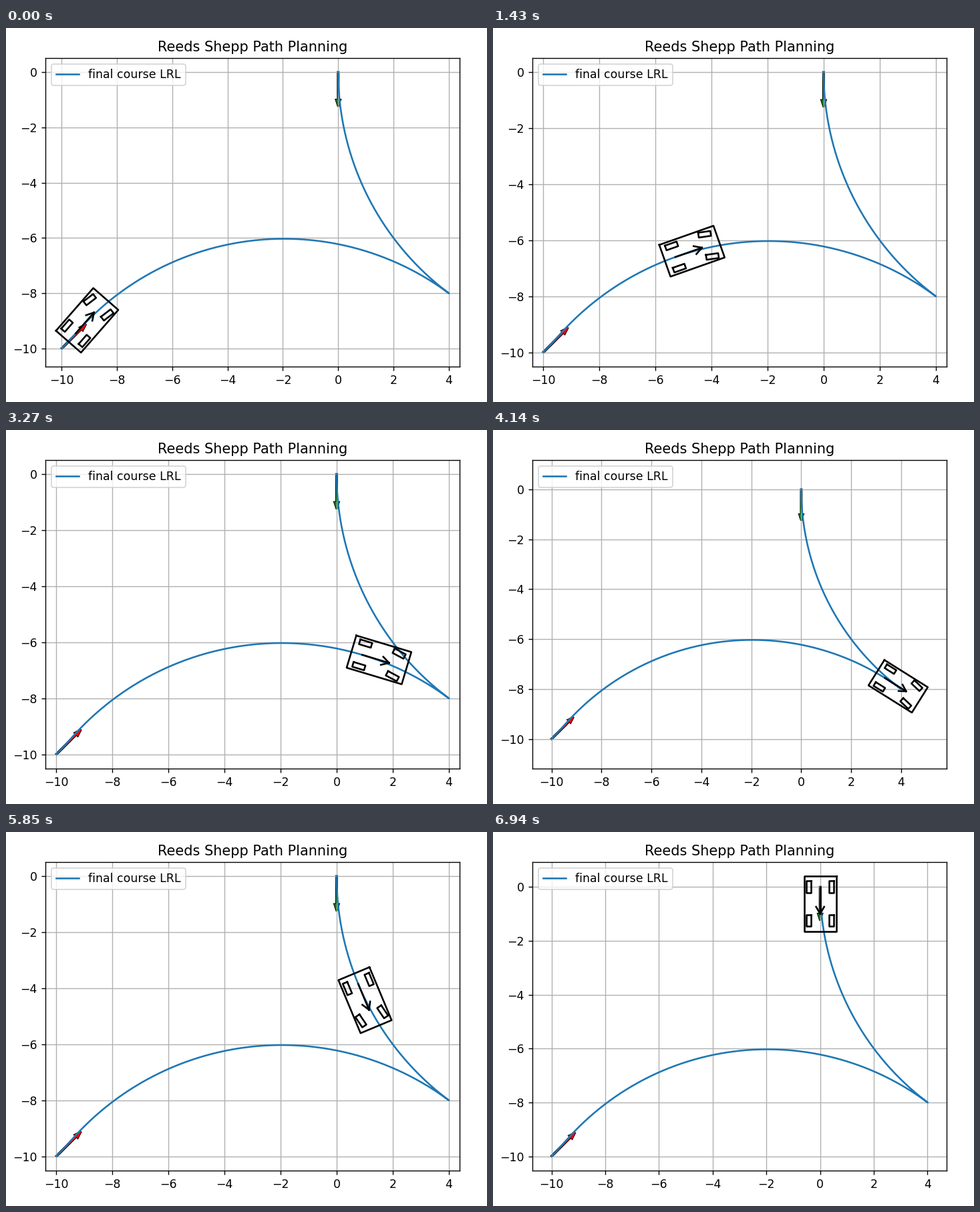
Write a matplotlib script that moves like this. It is 720x560 px and loops after 7.31 s.

```python
import numpy as np
import matplotlib.pyplot as plt
from matplotlib.animation import FuncAnimation

W, H, DPI = 720, 560, 125
LOOP, STEP = 7310, 34  # ms

# Reeds-Shepp path: left forward, right forward, left backward
R = 10.0
YAW0, YAW3 = np.deg2rad(45), np.deg2rad(-90)
START, GOAL = np.array([-10.0, -10.0]), np.array([0.0, 0.0])


def normal(yaw):
    return np.array([-np.sin(yaw), np.cos(yaw)])


C1 = START + R * normal(YAW0)
C3 = GOAL + R * normal(YAW3)
half = (C3 - C1) / 2
dist = np.hypot(*half)
C2 = (C1 + C3) / 2 + np.array([half[1], -half[0]]) / dist * np.sqrt(4 * R * R - dist ** 2)

YAW1 = np.arctan2(*(C2 - C1)[::-1]) + np.pi / 2
YAW2 = np.arctan2(*(C3 - C2)[::-1]) - np.pi / 2
YAWS = [YAW0, YAW1, YAW2, YAW3]
MARKS = np.concatenate([[0], np.cumsum(R * np.abs(np.diff(YAWS)))])
TOTAL = MARKS[-1]


def pose(s):
    yaw = np.interp(s, MARKS, YAWS)
    if s < MARKS[1]:
        return C1 - R * normal(yaw), yaw
    if s < MARKS[2]:
        return C2 + R * normal(yaw), yaw
    return C3 - R * normal(yaw), yaw


# Distance driven over time, and the moments when the view stalls
TIMES = [0, 680, 1520, 2250, 2940, 3600, 4140, 4850, 5180, 5850, 6020, 6940]
DRIVEN = [0.75, 3.28, 6.14, 8.55, 10.95, 13.35, 14.9, 17.65, 18.8, 21.03, 21.7, TOTAL]
STALLS = [(0, 30), (680, 790), (2250, 2320), (2940, 3270), (3600, 3800),
          (4850, 4920), (5180, 5310), (5850, 5950)]


def driven(t):
    for a, b in STALLS:
        if a <= t < b:
            t = a
    return np.interp(t, TIMES, DRIVEN)


# Vehicle dimensions
FRONT, REAR, WIDTH = 1.65, 0.4, 1.2
BASE, TREAD = 1.25, 0.84
TIRE_R, TIRE_W = 0.22, 0.175
STEER = np.arctan(0.2)


def box(x0, x1, w):
    return np.array([[x0, x0, x1, x1, x0], [w, -w, -w, w, w]])


def rotate(pts, a):
    c, s = np.cos(a), np.sin(a)
    return np.array([[c, -s], [s, c]]) @ pts


def car_shapes(steer):
    shapes = [box(-REAR, FRONT, WIDTH / 2)]
    tire = box(-TIRE_R, TIRE_R, TIRE_W / 2)
    for x, a in ((0, 0), (BASE, steer)):
        for y in (-TREAD / 2, TREAD / 2):
            shapes.append(rotate(tire, a) + np.array([[x], [y]]))
    length = 0.8 * BASE
    shapes.append(np.array([[0, length], [0, 0]]))
    for a in (np.pi - np.pi / 6, np.pi + np.pi / 6):
        wing = 0.3 * length * np.array([np.cos(a), np.sin(a)])
        shapes.append(np.array([[length, length + wing[0]], [0, wing[1]]]))
    return shapes


fig = plt.figure(figsize=(W / DPI, H / DPI), dpi=DPI)
ax = fig.add_axes([59 / W, 53 / H, 620 / W, 462 / H])
course = np.array([pose(s)[0] for s in np.linspace(0, TOTAL, 500)])
ax.plot(course[:, 0], course[:, 1], label="final course LRL")


def marker(p, yaw, color):
    for edge, lw in (("k", 1.6), (color, 0.5)):
        ax.arrow(*p, np.cos(yaw), np.sin(yaw), fc=color, ec=edge, lw=lw,
                 width=0.03, head_length=0.25, head_width=0.1625)


marker(START, YAW0, "r")
marker(GOAL, YAW3, "g")
car = [ax.plot([], [], "k")[0] for _ in car_shapes(0)]
ax.set_title("Reeds Shepp Path Planning")
ax.legend(loc="upper left")
ax.grid(True)
ax.axis("equal")


def draw(i):
    s = driven((i + 0.5) * STEP)
    p, yaw = pose(s)
    steer = 0 if s >= TOTAL else STEER if s > MARKS[2] else -STEER
    for line, pts in zip(car, car_shapes(steer)):
        line.set_data(*(rotate(pts, yaw) + p[:, None]))
    ax.relim()
    ax.autoscale_view()
    return car


anim = FuncAnimation(fig, draw, frames=LOOP // STEP, interval=STEP,
                     repeat=True, repeat_delay=0)
plt.show()
```
